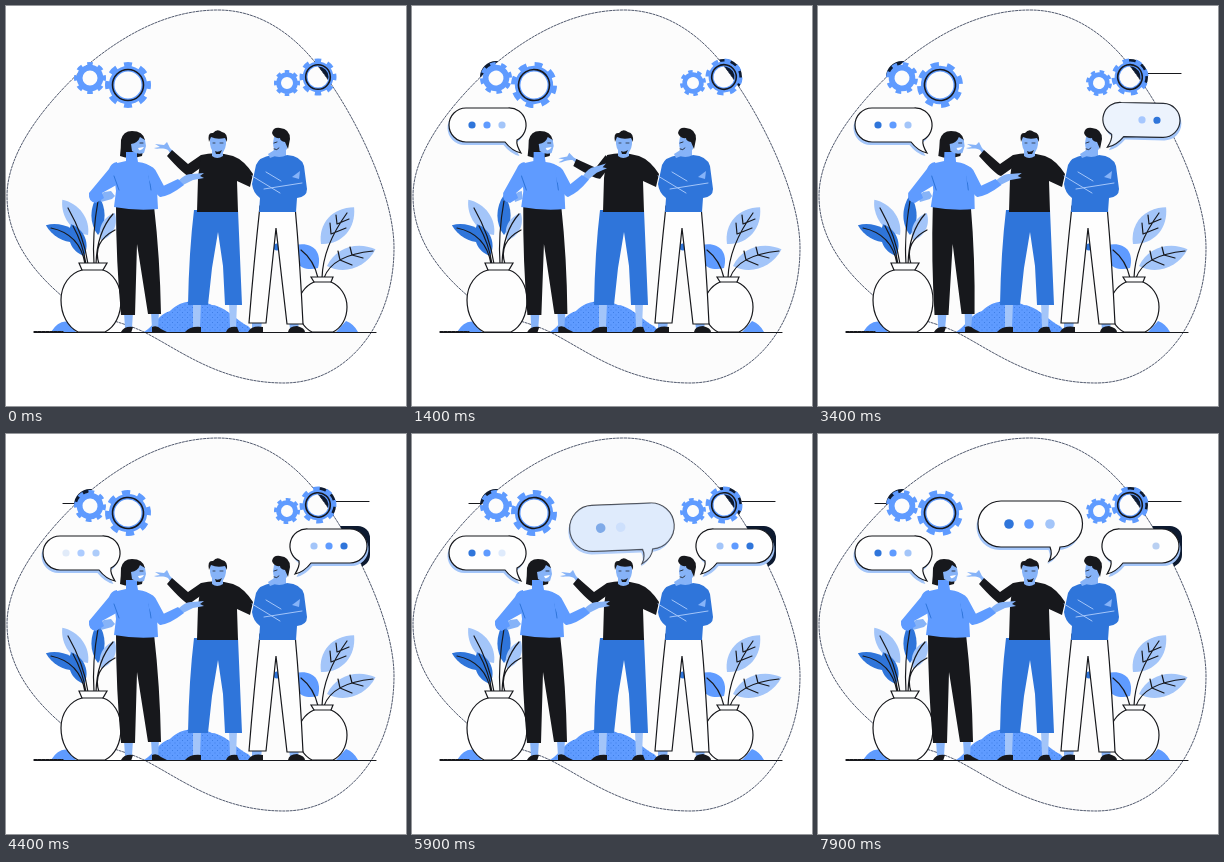
An HTML page for the animation above (8 s loop, 400 by 400 pixels).

```html
<!DOCTYPE html>
<html lang="en">
<head>
<meta charset="utf-8">
<title>Three people talking</title>
<style>
  html, body { margin: 0; width: 100%; height: 100%; overflow: hidden; background: #fff; }
  svg { display: block; width: 100vw; height: 100vh; }
  .k { fill: #17181c; } .b { fill: #2f75da; } .m { fill: #5f9bff; } .l { fill: #a3c5f9; }
  .s { fill: #86b3f8; } .w { fill: #fefefe; stroke: #17181c; stroke-width: 1.2; }
  .n { fill: none; stroke: #17181c; stroke-width: 1.2; stroke-linecap: round; stroke-linejoin: round; }
  .t { fill: none; stroke: #a3c5f9; stroke-width: 1; stroke-linecap: round; }
</style>
</head>
<body>
<svg viewBox="0 0 400 400">
  <defs>
    <path id="blob" d="M212 4C255 4 289 30 312 60C345 102 388 185 388 242C388 320 340 377 278 377C215 377 175 345 140 327C110 312 80 312 57 291C30 268 1 235 1 190C1 145 40 97 78 62C112 33 158 4 212 4Z"/>
    <mask id="outside"><path fill="#fff" d="M0 0H400V400H0Z"/><use href="#blob" fill="#000"/></mask>
    <pattern id="grain" width="5" height="5" patternUnits="userSpaceOnUse">
      <path fill="#3f7fe6" d="M1 1h1v1h-1zM3.5 3.5h1v1h-1z"/>
    </pattern>
    <path id="leaf" d="M0 0C-11 -10 -11 -27 0 -38C11 -27 11 -10 0 0Z"/>
    <path id="hill" d="M138 326C149 319 153 308 164 305C174 294 192 292 206 299C219 300 231 315 242 320L248 326Z"/>
  </defs>

  <use href="#blob" fill="#fcfcfc" stroke="#26304a" stroke-width=".8" stroke-dasharray="3 .6"/>
  <g mask="url(#outside)" fill="#0d1a30">
    <circle cx="312" cy="71" r="12"/>
    <g id="darkGears"><circle cx="84" cy="71" r="16"/><circle cx="312" cy="71" r="18"/></g>
    <rect id="darkBubble" x="300" y="92" width="64" height="41" rx="12"/>
  </g>
  <path id="lineR" class="n" d="M330 67.500H363"/>
  <path id="lineL" class="n" d="M57 69.500H70"/>
  <g id="gears"></g>

  <!-- ground -->
  <use href="#hill" class="m"/>
  <use href="#hill" fill="url(#grain)"/>
  <path class="m" d="M45 326Q53 313 63 316L70 326ZM330 326L340 315Q348 318 352 326Z"/>

  <!-- left plant -->
  <use href="#leaf" class="l" transform="translate(82 229) rotate(-36) scale(1.050 1.150)"/>
  <use href="#leaf" class="b" transform="translate(92 229) rotate(0) scale(.8 1.050)"/>
  <use href="#leaf" class="b" transform="translate(77 235) rotate(-67) scale(.85 1.060)"/>
  <use href="#leaf" class="b" transform="translate(78 250) rotate(-22) scale(.95 .9)"/>
  <use href="#leaf" class="l" transform="translate(95 234) rotate(27) scale(.8)"/>
  <path class="n" d="M82 258Q78 230 62 202M88 258Q86 228 92 195M79 258Q74 228 45 222M80 258Q77 238 67 220M90 258Q91 226 107 208M93 258Q86 236 109 224"/>
  <path class="w" d="M76 264C64 267 55 279 55 294C55 309 62 321 72 326H99C109 321 115 309 115 294C115 279 107 267 97 264L101 257H73Z"/>
  <path class="n" d="M76 264H97"/>

  <!-- right plant -->
  <use href="#leaf" class="l" transform="translate(315 238) rotate(42) scale(1.450 1.300)"/>
  <use href="#leaf" class="l" transform="translate(321 260) rotate(71) scale(1.300 1.350)"/>
  <use href="#leaf" class="m" transform="translate(312 262) rotate(-45) scale(1.350 .85)"/>
  <circle class="b" cx="271" cy="241" r="3.500"/>
  <path class="n" d="M316 272Q317 240 341 207M318 272Q326 249 367 245M312 272Q308 254 295 244M325 228L324 217M325 228L340 222M331 218L330 209M331 218L343 213M334 254L332 245M334 254L346 259M346 249L344 241M346 249L357 252"/>
  <path class="w" d="M308 276C299 280 292 289 292 301C292 313 298 322 306 326H327C335 322 341 313 341 301C341 289 334 280 325 276L327 271H305Z"/>
  <path class="n" d="M308 276H325M28 326.500H370"/>
  <path class="n" stroke-dasharray="3 1" d="M28 325.500H57"/>

  <!-- middle man -->
  <path class="l" d="M187 297H195L194 322H187ZM223 297H231L230 322H224Z"/>
  <path class="k" d="M179 326Q184 320 195 321V326ZM220 326Q222 320 231 321L233 326Z"/>
  <path class="b" d="M188 204H232L236 299H219L217 260L212 226L206 262L202 299H182Q183 245 188 204Z"/>
  <g id="manArm">
    <path class="s" d="M166 150L162 144C156 141 151 144 148 142L154 141L149 138L158 139L161 136L164 142L169 147Z"/>
    <path class="k" d="M166 144L182 158L195 149L200 158L183 170Q178 169 161 150Z"/>
  </g>
  <path class="k" d="M195 149Q211 145 227 150Q238 154 247 168L244 181L231 175L232 206H191L192 172Z"/>
  <path class="s" d="M206 143H217V150Q211 154 206 150Z"/>
  <path class="s" d="M204 130H220V138Q219 148 212 148Q205 147 204 138Z"/>
  <path class="k" d="M203 136Q201 126 207 127Q211 122 216 126Q222 127 221 136L219 132Q211 134 205 131ZM209 145Q212 147 216 144L214 148H210Z"/>
  <path class="n" style="stroke-width:.7" d="M207 137H209M214 137H217"/>

  <!-- right man -->
  <path class="s" d="M246 315H256L255 323H246ZM283 315H293L292 323H284Z"/>
  <path class="k" d="M242 326Q246 319 257 321V326ZM282 326Q283 320 291 320Q299 322 299 326Z"/>
  <path class="w" d="M254 200H289Q294 255 297 318H281L270 222L260 317H243Q248 255 254 200Z"/>
  <path class="s" d="M268 141H280V152Q273 155 267 151Z"/>
  <path class="b" d="M266 149Q273 153 281 149Q295 150 298 160L301 183Q301 191 291 192L290 206H253L254 192Q247 187 246 178L250 159Q253 151 266 149Z"/>
  <path class="t" d="M246 170L274 187M260 166L275 175M258 183L296 177"/>
  <path class="s" d="M286 171L294 165L293 173Z"/>
  <path class="s" d="M268 131H281L282 140Q280 148 273 147Q267 145 267 137Z"/>
  <path class="s" d="M262 148L270 143L272 149L264 152Z"/>
  <path class="k" d="M266 127Q267 121 274 122Q284 123 284 133L282 143L279 136Q274 135 274 132Q268 133 266 127Z"/>
  <path class="n" style="stroke-width:.8" d="M268 137L271 136M268 143Q271 145 273 142"/>

  <!-- woman -->
  <g id="woman">
    <path class="s" d="M118 306H127L126 322H119ZM145 306H153L152 322H146Z"/>
    <path class="k" d="M115 326Q118 320 127 321L125 327ZM146 326V321Q151 319 155 323L161 326Z"/>
    <path class="k" d="M110 200H148Q154 252 155 308H142L131 238L129 309H115Q110 255 110 200Z"/>
    <path id="hipHand" class="s"/>
    <path id="hipArm" class="m"/>
    <path class="m" d="M120 150Q125 153 131 150L132 156Q142 157 146 162L151 184L152 203Q130 205 108 201L110 185L107 158L120 155Z"/>
    <path class="t" style="stroke:#2f75da" d="M113 184L108 170M145 184L143 170"/>
    <path class="m" d="M141 159Q148 160 151 167L158 180Q160 190 154 191Q149 188 143 174Z"/>
    <g id="forearm">
      <path class="s" d="M172 175Q180 167 186 168L198 167L194 170L198 172L187 174L177 179Z"/>
      <path class="m" d="M153 182L172 173L178 179Q164 190 154 191Z"/>
    </g>
    <path class="k" d="M114 150Q115 141 115 134Q117 125 126 125Q137 125 139 134L136 150Q124 154 114 150Z"/>
    <path class="m" d="M120 146H131V155H120Z"/>
    <path class="s" d="M125 138Q132 137 134 131L139 134L140 140L138 147Q131 149 126 145Z"/>
    <path class="n" style="stroke-width:.8" d="M134 137H137"/>
    <path d="M132 142L138 141Q136 145 133 144Z" fill="#fff"/>
  </g>
  <g id="bubbles"></g>
</svg>
<script>
const LOOP = 8, STEP = 0.1;
const $ = id => document.getElementById(id);
const clamp = v => Math.max(0, Math.min(1, v));
const ease = v => (v = clamp(v), v * v * (3 - 2 * v));
const ramp = (t, from, length) => clamp((t - from) / length);

// Eased value through a list of [time, value] pairs
function key(t, pairs) {
  let value = pairs[0][1];
  for (let i = 1; i < pairs.length; i++) {
    const [a, v] = pairs[i - 1], [b, w] = pairs[i];
    if (t >= a) value = v + (w - v) * ease((t - a) / (b - a));
  }
  return value;
}

// The hole stays open so that the ground behind shows through
function gear(x, y, size, hole, angle, ring) {
  const rim = size * 0.83;
  return `<g transform="translate(${x} ${y}) rotate(${angle})" fill="none" stroke="#5f9bff">
    <circle r="${(rim + hole) / 2}" stroke-width="${rim - hole}"/>
    <circle r="${size * 0.89}" stroke-width="${size * 0.22}"
      pathLength="16" stroke-dasharray="1" stroke-dashoffset=".5"/>
    ${ring ? `<circle r="${ring}" class="n" style="stroke-width:1.6"/>` : ''}</g>`;
}

const SIDE = 'M54 102H96A17 17 0 0 1 105 134Q104 139 109 147Q100 145 93 136H54A17 17 0 0 1 54 102Z';
const TOP = 'M183 67H241A23 23 0 0 1 242 113Q241 122 231 127Q235 120 232 113H183A23 23 0 0 1 183 67Z';
const SHADES = ['#2f75da', '#5f9bff', '#a3c5f9'];
const BUBBLES = [
  { start: 0.5, path: SIDE, tip: [109, 147], dots: [60, 75, 90], y: 119, r: 3.6, place: '' },
  { start: 3, path: SIDE, tip: [109, 147], dots: [60, 75, 90], y: 119, r: 3.6, place: 'matrix(-1 0 0 1 398 -7)' },
  { start: 5.6, path: TOP, tip: [231, 127], dots: [191, 211, 232], y: 90, r: 4.8, place: '' }
];

function bubble({ start, path, tip: [x, y], dots, y: dotY, r, place }, t) {
  const age = t - start, p = ramp(age, 0, 0.5);
  if (p <= 0) return '';
  const scale = 0.6 + 0.4 * ease(p * 1.7);
  const marks = dots.map((cx, i) => {
    const first = ramp(age, 0.1 + i * 0.15, 0.3);
    const gone = ramp(age, 3.6 + i * 0.13, 0.35);
    const again = ramp(age, 4.8 + i * 0.25, 0.3);
    return `<circle cx="${cx}" cy="${dotY}" r="${r}" fill="${SHADES[i]}" opacity="${first * Math.max(1 - gone, again)}"/>`;
  }).join('');
  return `<g transform="${place} translate(${x - 2 * (1 - p)} ${y + 6 * (1 - p)}) rotate(${-6 * (1 - p)}) scale(${scale}) translate(${-x} ${-y})" opacity="${Math.min(1, p * 1.4)}">
    <path d="${path}" class="l" transform="translate(-1.5 3)"/>
    <path d="${path}" class="w"/>
    <path d="${path}" class="l" opacity="${1 - p}"/>${marks}</g>`;
}

function draw(t) {
  const turn = t * 9;
  $('gears').innerHTML = gear(84, 72, 16, 7.5, -turn) + gear(122, 79, 23, 13.5, turn, 15.5) +
    gear(281, 77, 13, 6, -turn) + gear(312, 71, 18.5, 10.5, turn, 12.3);
  $('darkGears').setAttribute('opacity', ramp(t, 0.1, 0.8));
  $('darkBubble').setAttribute('opacity', ramp(t, 3.4, 0.3));
  $('lineR').setAttribute('opacity', t >= 2.9 ? 1 : 0);
  $('lineL').setAttribute('opacity', t >= 3.8 ? 1 : 0);

  // Woman leans from the feet, gestures and settles again
  const lean = key(t, [[1.2, 0], [1.8, 1], [3.7, 1], [4.3, 0]]);
  $('woman').setAttribute('transform', `matrix(1 0 ${-0.03 * lean} 1 ${10.8 * lean} 0)`);
  const e = key(t, [[0.4, 0], [1.2, 8], [1.9, 2], [3.7, 2], [4.3, 0]]);
  $('hipHand').setAttribute('d', `M${93 + e} 190L${98 + e} 186L${105 + e / 2} 185L109 190L${106 + e / 2} 193L${95 + e} 196Z`);
  $('hipArm').setAttribute('d', `M111 156Q105 157 103 163L${83 + e} 187Q${82 + e} 196 ${90 + e} 197L${98 + e} 192L${96 + e} 187L114 177Z`);

  // Her hand rises while the man lowers his
  const gesture = key(t, [[0.4, 0], [1.2, 1], [1.8, 1], [2.5, 0]]);
  $('forearm').setAttribute('transform', `rotate(${-13 * gesture} 153 187)`);
  $('manArm').setAttribute('transform', `rotate(${-17 * gesture} 195 154)`);
  $('bubbles').innerHTML = BUBBLES.map(b => bubble(b, t)).join('');
}

function frame() {
  const t = performance.now() / 1000 % LOOP;
  draw(Math.floor(t / STEP + 1e-6) * STEP);
  requestAnimationFrame(frame);
}
frame();
</script>
</body>
</html>
```
